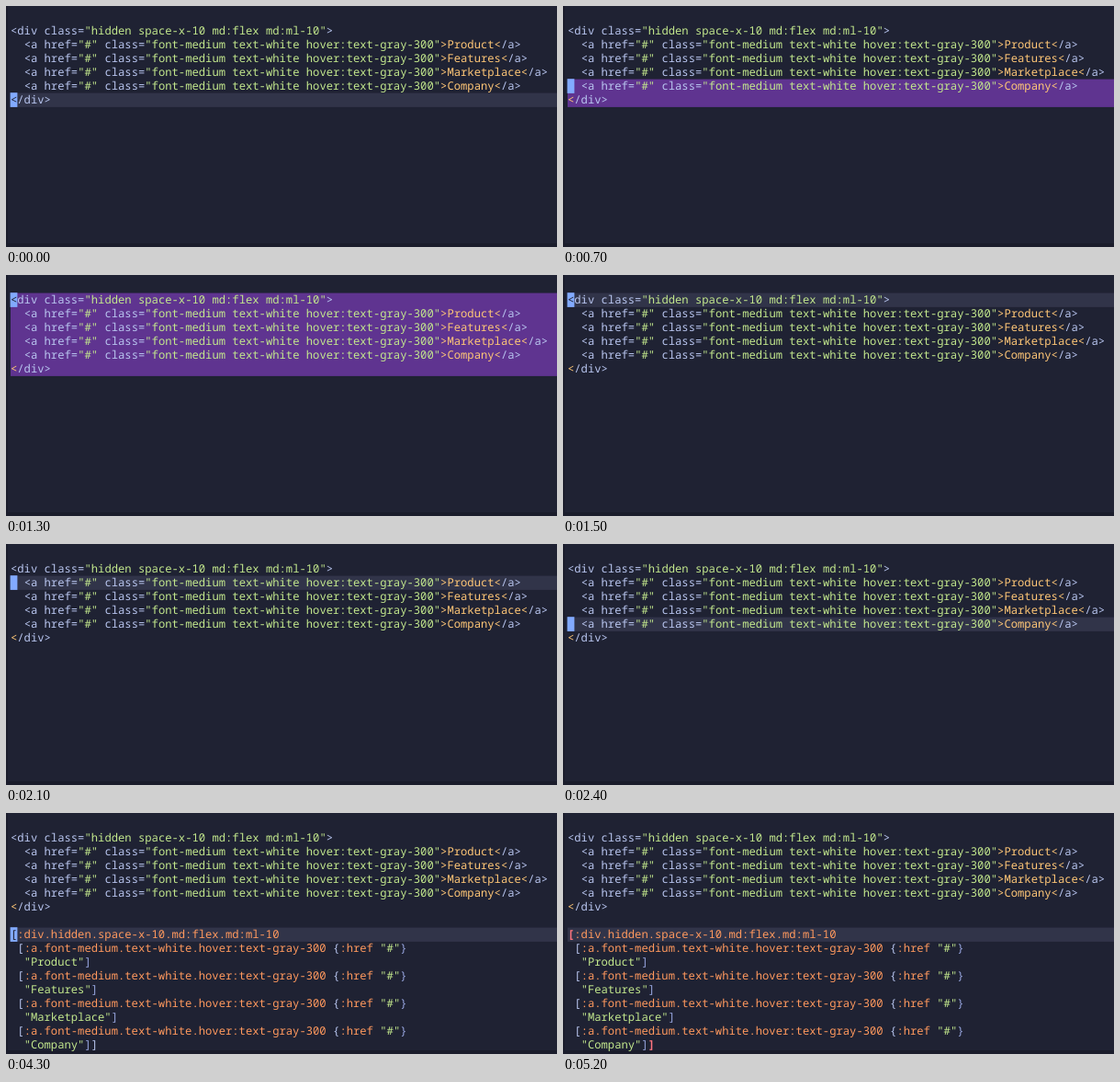
An HTML page for the animation above (6300 ms loop, 600 by 262 pixels).

```html
<!DOCTYPE html>
<html lang="en">
<head>
<meta charset="utf-8">
<title>Markup conversion in an editor</title>
<style>
  html, body { margin: 0; width: 100%; height: 100%; overflow: hidden; background: #1f2233; }
  svg { display: block; width: 600px; height: 262px; }
  text {
    font: 12.19px "Noto Sans Mono", "DejaVu Sans Mono", monospace;
    white-space: pre;
    text-rendering: geometricPrecision;
  }
  .plain { fill: #b9c6f0; }
  .closing { fill: #98a6e0; }
  .string { fill: #c3e88d; }
  .content { fill: #ffc777; }
  .keyword { fill: #ff995e; }
  .match { fill: #ff757f; font-weight: bold; }
  .under { fill: #1f2233; }
</style>
</head>
<body>
<svg viewBox="0 0 600 262">
  <rect width="600" height="262" fill="#1f2233"/>
  <path d="M0 0H2V258H600V262H0Z" fill="#1a1c2b"/>
  <rect id="band" x="5" width="595"/>
  <g id="html"></g>
  <g id="hiccup"></g>
  <rect id="cursor" x="4.6" width="7.8" fill="#82aaff"/>
  <g id="glyph"></g>
</svg>
<script>
const LOOP = 6300, LEFT = 5, TOP = 19.6, CHAR = 7.314, LINE = 15;
const $ = id => document.getElementById(id);
const baseline = row => TOP + row * LINE + 11.7;

function put(parent, row, col, text, kind) {
  const node = document.createElementNS("http://www.w3.org/2000/svg", "text");
  node.setAttribute("x", LEFT + col * CHAR);
  node.setAttribute("y", baseline(row));
  node.setAttribute("class", kind);
  node.textContent = text;
  parent.append(node);
  return node;
}

function putLine(parent, row, col, ...tokens) {
  for (const [kind, text] of tokens) {
    put(parent, row, col, text, kind);
    col += text.length;
  }
}

function placeRows(rect, first, last, margin = 0) {
  rect.setAttribute("y", TOP + first * LINE - margin);
  rect.setAttribute("height", (last - first + 1) * LINE + 0.3 + margin);
}

const plain = s => ["plain", s], closing = s => ["closing", s];
const string = s => ["string", s], content = s => ["content", s];
const keyword = s => ["keyword", s];
const labels = ["Product", "Features", "Marketplace", "Company"];
const html = $("html"), hiccup = $("hiccup");

putLine(html, 0, 0, plain("<div class="), string('"hidden space-x-10 md:flex md:ml-10"'), plain(">"));
labels.forEach((label, i) => putLine(html, 1 + i, 2,
  plain("<a href="), string('"#"'), plain(" class="),
  string('"font-medium text-white hover:text-gray-300"'),
  content(`>${label}<`), plain("/a>")));
putLine(html, 5, 0, content("<"), plain("/div>"));

const opener = put(hiccup, 7, 0, "[", "plain");
putLine(hiccup, 7, 1, keyword(":div.hidden.space-x-10.md:flex.md:ml-10"));
labels.forEach((label, i) => {
  const row = 8 + 2 * i;
  putLine(hiccup, row, 1, plain("["), keyword(":a.font-medium.text-white.hover:text-gray-300"),
    plain(" {"), keyword(":href"), string(' "#"'), closing("}"));
  putLine(hiccup, row + 1, 2, string(`"${label}"`), closing("]"));
});
const closer = put(hiccup, 15, 12, "]", "plain");

const glyph = put($("glyph"), 0, 0, "", "under");

// Key repeat: one row per 130 ms, seen on a 100 ms grid.
const moves = (t, start, most) =>
  t < start ? 0 : Math.min(most, 1 + Math.floor((t - start) / 130));

const cursorRow = t => t < 2000 ? 5 - moves(t, 700, 5) : moves(t, 2000, 7);

function draw(time) {
  const t = Math.floor((time % LOOP) / 100) * 100;
  const row = cursorRow(t);
  const selecting = t >= 200 && t < 1500;
  const pasted = t >= 4300, matched = t >= 4400, cursorOn = t < 5200;

  placeRows($("band"), row, selecting ? 5 : row);
  $("band").setAttribute("fill", selecting ? "#5f3490" : "#313449");

  hiccup.style.display = pasted ? "" : "none";
  for (const bracket of [opener, closer])
    bracket.setAttribute("class", matched ? "match" : "plain");

  placeRows($("cursor"), row, row, 0.4);
  $("cursor").style.display = $("glyph").style.display = cursorOn ? "" : "none";
  glyph.textContent = row === 0 || row === 5 ? "<" : pasted ? "[" : "";
  glyph.setAttribute("y", baseline(row));
}

const start = performance.now();
function frame() {
  draw(performance.now() - start);
  requestAnimationFrame(frame);
}
frame();
</script>
</body>
</html>
```
